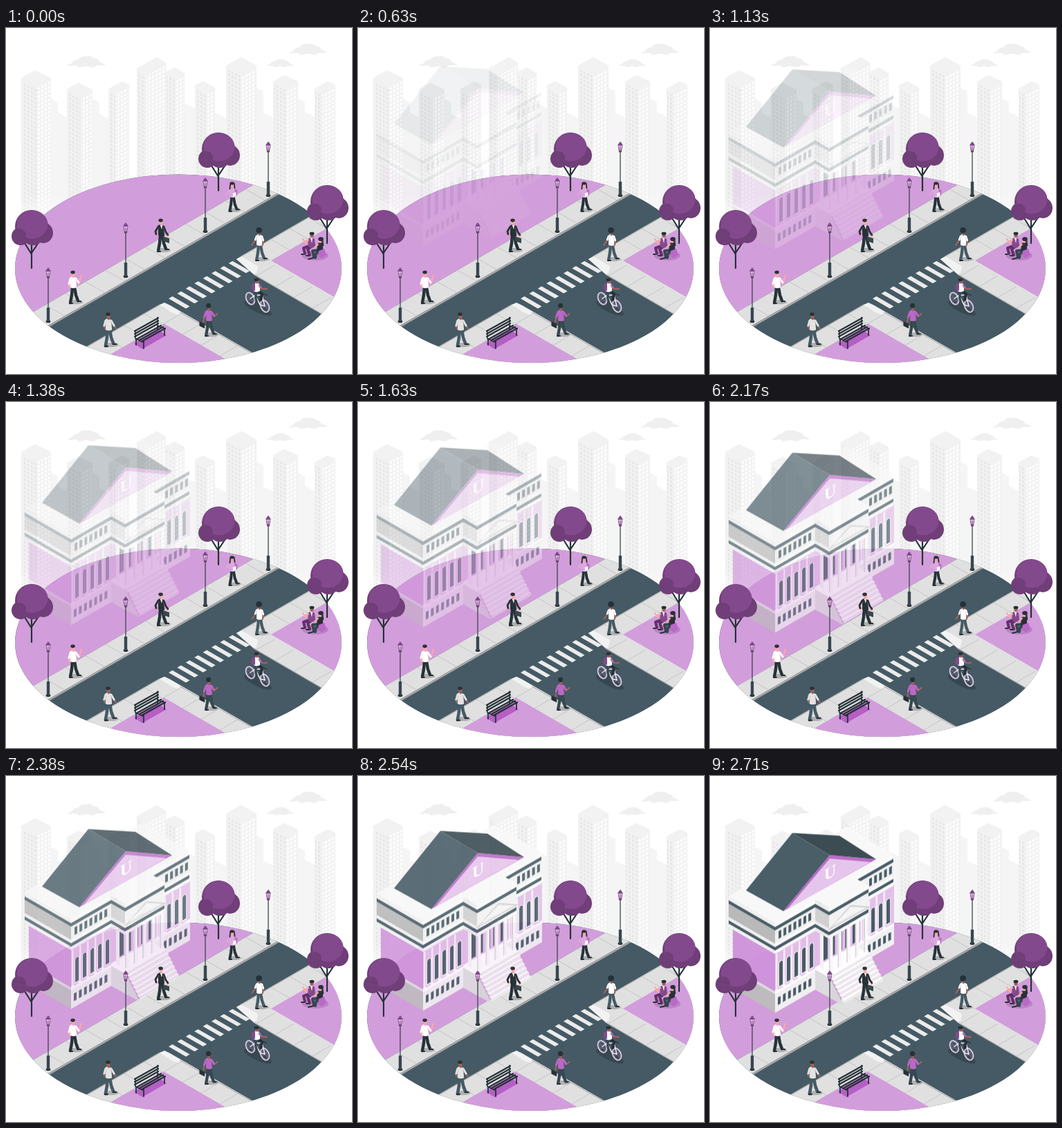
Write an HTML page that moves like this. It is 500 px wide and 500 px high and loops after 2750 ms.

```html
<!DOCTYPE html>
<html lang="en">
<head>
<meta charset="utf-8">
<title>City crossing</title>
<style>
  html, body { margin: 0; width: 100%; height: 100%; overflow: hidden; background: #fff; }
  svg { display: block; width: 100vw; height: 100vh; }
  .hall { animation: settle 2750ms ease-in infinite; }
  @keyframes settle {
    from { opacity: 0; transform: translateY(-30px); }
    to { opacity: 1; transform: translateY(0); }
  }
</style>
</head>
<body>
<svg id="stage" viewBox="0 0 500 500"></svg>
<script>
const DARK = '#263238', SLATE = '#455a64', NIGHT = '#37474f';
const LAWN = '#d29ddb', PLUM = '#82498c', DEEP = '#703e78', ORCHID = '#ba68c8';
const PAVE = '#e0e0e0', SKIN = '#ffa8a0', BROWN = '#a5605a';
const ISO = 0.577;

const poly = (pts, fill, extra = '') => `<polygon points="${pts}" fill="${fill}" ${extra}/>`;
const line = (d, stroke, w = 1) =>
  `<path d="${d}" fill="none" stroke="${stroke}" stroke-width="${w}" stroke-linecap="round" stroke-linejoin="round"/>`;
const shape = (d, fill) => `<path d="${d}" fill="${fill}"/>`;
const rect = (x, y, w, h, fill) => `<rect x="${x}" y="${y}" width="${w}" height="${h}" fill="${fill}"/>`;
const oval = (x, y, rx, ry, fill, extra = '') =>
  `<ellipse cx="${x}" cy="${y}" rx="${rx}" ry="${ry}" fill="${fill}" ${extra}/>`;
const at = (x, y, body, s = 1) => `<g transform="translate(${x} ${y}) scale(${s})">${body}</g>`;
// Upright planes: dir -1 rises to the right, +1 falls to the right.
const plane = (x, y, dir, body) => `<g transform="matrix(1 ${dir * ISO} 0 1 ${x} ${y})">${body}</g>`;
const repeat = (n, f) => Array.from({ length: n }, (_, i) => f(i)).join('');

const defs = `<defs>
  <clipPath id="disc"><ellipse cx="249" cy="347.7" rx="236" ry="136.3"/></clipPath>
  <pattern id="shade" width="5" height="6" patternUnits="userSpaceOnUse" patternTransform="matrix(1 .5 0 1 0 0)">
    ${rect(1, 1, 2.6, 3.6, '#e5e5e5')}</pattern>
  <pattern id="lit" width="5" height="6" patternUnits="userSpaceOnUse" patternTransform="matrix(1 -.5 0 1 0 0)">
    ${rect(1, 1, 3, 3.6, '#fff')}</pattern>
  <linearGradient id="mist" x1="0" y1="0" x2="0" y2="1">
    <stop offset="0" stop-color="#fff" stop-opacity="0"/><stop offset="1" stop-color="#fff"/></linearGradient>
</defs>`;

function tower(lx, ly, px, py, rx, ry) {
  const fx = lx + rx - px, fy = ly + ry - py;
  return poly([lx, ly, px, py, rx, ry, rx, 290, lx, 290], '#f2f2f2') +
    poly([lx + 1, ly + 4, fx, fy + 4, fx, 290, lx + 1, 290], 'url(#shade)') +
    poly([fx, fy + 4, rx - 1, ry + 4, rx - 1, 290, fx, 290], 'url(#lit)');
}
const block = (x, w, y) => poly([x, y, x + w, y + w * 0.5, x + w, 290, x, 290], '#f5f5f5');

const skyline =
  block(64, 11, 102) + block(74, 16, 122) + block(124, 11, 102) + block(134, 15, 124) +
  block(257, 17, 108) + block(301, 18, 122) + block(361, 11, 86) + block(371, 16, 122) +
  block(421, 11, 102) + block(431, 16, 121) +
  tower(231, 63, 244, 57, 258, 65) + tower(22, 72, 42, 61, 65, 72) +
  tower(88, 88, 105, 79, 125, 89) + tower(148, 88, 168, 77, 178, 82) +
  tower(189, 58, 218, 42, 231, 50) + tower(273, 83, 285, 77, 302, 86) +
  tower(318, 54, 340, 42, 362, 54) + tower(386, 77, 402, 68, 422, 77) +
  tower(446, 87, 465, 77, 476, 82) + rect(0, 240, 500, 55, 'url(#mist)');

const puff = shape('M-28 6 L-20 1 Q-18 -3 -12 -3 Q-7 -9 0 -8 Q6 -10 12 -5 Q18 -5 19 0 Q24 1 28 5 L16 5 L10 8 L0 6 L-10 8 L-15 5 Z', '#efefef');
const clouds = at(116, 49, puff) + at(396, 51, puff, .72) + at(436, 31, puff);

const stripes = repeat(8, i => at(235 + i * 12.4, 391 - i * 7.3,
  poly([0, 0, 5.5, -3.2, 30.5, 11.2, 25, 14.4], '#ebebeb')));
const joint = (x, y, dx, dy) => line(`M${x} ${y}l${dx} ${dy}`, '#b8b8b8', .7);

const ground = oval(249, 347.7, 236, 136.3, SLATE) + `<g clip-path="url(#disc)">` +
  poly([0, 433, 0, 180, 440, 179], LAWN) +
  poly([0, 433, 440, 179, 468, 195, 0, 465], PAVE) +
  poly([0, 465, 468, 195, 468, 198, 0, 468], '#a6a6a6') +
  repeat(15, i => joint(28 + i * 29, 417 - i * 16.7, 28, 16)) +
  poly([40, 505, 222, 400, 229, 397, 236, 400, 420, 506, 300, 570], PAVE) +
  poly([222, 400, 229, 397, 252, 410, 250, 415, 241, 412], '#f2f2f2') +
  line('M222 400L40 505M252 411L420 507', '#b5b5b5', 1.4) +
  repeat(5, i => joint(200 - i * 29, 413 + i * 16.7, 26, 15)) +
  repeat(5, i => joint(254 + i * 27, 412 + i * 15.6, -27, 16)) +
  poly([60, 524, 228, 427, 420, 538], LAWN) +
  poly([333, 334, 520, 226, 520, 450, 358, 356], PAVE) +
  poly([333, 334, 340, 330, 364, 344, 362, 354, 358, 356], '#f2f2f2') +
  line('M340 330L520 226M358 356L520 450', '#b5b5b5', 1.4) +
  repeat(4, i => joint(356 + i * 27, 321 - i * 15.6, 26, 15)) +
  repeat(5, i => joint(362 + i * 27, 358 + i * 15.6, 26, -15)) +
  poly([383, 336, 520, 257, 520, 415], LAWN) +
  stripes + '</g>';

// Wall layers shared by every face of the hall, from cornice to lower string course.
const bands = (x, w, tone, attic) =>
  rect(x, 0, w, 6.5, tone) + rect(x, 11, w, 20, attic) + rect(x, 30, w, 5.5, tone) +
  rect(x, 6, w, 5, SLATE) + rect(x, 35, w, 5, SLATE) + rect(x, 40, w, 5, tone);
const slots = (x, n, gap, y, h) => repeat(n, i => rect(x + i * gap, y, 4, h, SLATE));
const arch = x => shape(`M${x} 97V63a3.6 4 0 0 1 7.2 0V97Z`, '#fafafa') +
  shape(`M${x + 1} 95V63a2.6 3 0 0 1 5.2 0V95Z`, SLATE);
const pilaster = x => rect(x, 46, 2.6, 54, '#f5f0f6') + rect(x - .8, 97, 4.2, 4, '#fff');

const leftSide = plane(94, 213, 1,
  rect(-61, 44, 61, 57, '#cf94db') + rect(-61, 100, 61, 30, '#bdbdbd') + rect(-61, 99, 61, 4, '#e0e0e0') +
  bands(-67, 67, '#f0f0f0', '#b8b8b8'));

const mainFront = plane(94, 213, -1,
  rect(0, 44, 172, 57, '#e3bfe9') + rect(0, 100, 172, 30, '#f2f2f2') + rect(0, 99, 172, 4, '#fff') +
  repeat(5, i => arch(5 + i * 11) + pilaster(1 + i * 11)) +
  repeat(5, i => rect(70 + i * 10.5, 47, 6, 48, SLATE)) +
  repeat(4, i => arch(127 + i * 11) + pilaster(123.5 + i * 11)) +
  slots(4, 7, 7.4, 110, 11) + slots(134, 5, 7.4, 110, 11) +
  bands(0, 171, '#fafafa', '#f0f0f0') +
  slots(5, 7, 7.2, 15, 11) + slots(136, 5, 7.2, 15, 11));

const deck = poly([27, 174, 197, 74, 265, 114, 228, 136, 208, 147, 228, 159, 172, 191, 152, 179.5, 94, 213], '#f8f8f8');

const roof =
  poly([173, 115, 240, 121, 106, 196], ORCHID) +
  poly([173, 120, 232, 125, 112, 193], '#e6c4ec') +
  poly([119, 83, 187, 87, 240, 121, 173, 115], NIGHT) +
  poly([119, 83, 52, 166, 106, 196, 173, 115], SLATE) +
  `<text transform="matrix(1 -.577 0 1 165 153)" font-family="Liberation Serif, serif" font-weight="700" font-size="24" fill="#fff">U</text>`;

const steps = repeat(7, i => at(172 + i * 3, 288 + i * 6,
  poly([0, 0, 57, -33, 60, -31, 3, 2], '#fff') + poly([3, 2, 60, -31, 60, -27, 3, 6], '#ececec')));

const portico =
  plane(152, 179.5, 1, rect(0, 97, 21, 33, '#dedede') + rect(0, 97, 21, 4, '#fff')) +
  poly([172, 290, 193, 332, 172, 321], '#d8d8d8') +
  poly([152, 277, 208, 245, 229, 257, 172, 290], '#fff') + steps +
  plane(152, 179.5, 1, rect(7, 44, 5, 50, '#f4f4f4') + bands(0, 20, '#ececec', '#cfcfcf')) +
  plane(172, 191, -1,
    repeat(5, i => rect(i * 12.6, 43, 5.6, 53, '#fafafa') + rect(i * 12.6, 43, 1.6, 53, '#dadada') +
      rect(i * 12.6 - 1, 94, 7.6, 4, '#fff')) +
    bands(0, 57, '#fafafa', '#f2f2f2')) +
  poly([172, 223, 203, 188, 230, 190], '#e8e8e8', 'stroke="#aaa" stroke-width=".7"') +
  poly([178, 216, 203, 191, 224, 191], '#f5f5f5');

const hall = `<g class="hall">${leftSide}${mainFront}${deck}${roof}${portico}</g>`;

const tree = (x, y) => at(x, y,
  line('M0 0V-36M0 -20L-10 -36M0 -22L10 -37', DARK, 2.2) +
  oval(-16, -46, 13, 13, DEEP) + oval(17, -51, 14, 15, DEEP) + oval(2, -45, 14, 12, DEEP) +
  oval(0, -60, 24, 24, DEEP) + oval(1, -63, 22.5, 20.5, PLUM) + oval(-17, -48, 9, 9, DEEP));

const lamp = (x, y) => at(x, y,
  oval(0, 0, 3.4, 2, DARK) + line('M0 -2V-66', NIGHT, 1.3) + rect(-2.2, -20, 4.4, 20, NIGHT) +
  poly([-3, -72, 3, -72, 2, -64, -2, -64], '#eed5f2') +
  line('M-2.6 -71L-1.6 -64M0 -71V-64M2.6 -71L1.6 -64', DEEP, 1) +
  shape('M-4 -72Q-2 -76 0 -78Q2 -76 4 -72Z', PLUM) + rect(-2, -65, 4, 2.5, DEEP));

function person(x, y, o) {
  const skin = o.skin || SKIN, coat = o.sleeve || o.top;
  return at(x, y,
    oval(4, -2, 10, 3.2, '#000', 'opacity=".22"') +
    line('M-1 -23L-2 -12L-4 -1', o.legs, 4.4) + line('M2 -23L4 -12L7 -4', o.legs, 4.4) +
    line('M-5 0h4M7 -3h4', DARK, 2.2) +
    shape('M-4 -38Q0 -40 4 -37L5 -23Q0 -21 -4 -23Z', o.top) +
    line(`M-4 -35${o.left}`, skin, 2.3) + line(`M4 -35${o.right}`, skin, 2.3) +
    line(`M-4 -36${o.left.split('L')[0]}`, coat, 2.8) + line(`M4 -36${o.right.split('L')[0]}`, coat, 2.8) +
    rect(-1, -41, 2.4, 4, skin) + oval(0, -43, 2.8, 3.6, skin) +
    oval(-.4, -45, o.hair || 3.2, o.hair || 2.4, DARK) + (o.extra || ''), o.s || 1);
}

const people =
  person(97, 398, { top: '#fff', legs: DARK, left: 'l-2 8L-5 -23', right: 'l4 6L12 -40' }) +
  person(224, 323, { top: DARK, legs: DARK, left: 'l-4 7l1 4L-5 -25', right: 'l3 8l3 4L9 -22',
    extra: poly([3, -22, 12, -19, 12, -12, 3, -15], NIGHT) + poly([-1, -38, 2, -38, 1, -32], '#fff') }) +
  person(327, 265, { top: '#d9a9e2', legs: DARK, left: 'l-4 6L-7 -29', right: 'l3 7L4 -25', s: .9,
    extra: line('M-3 -45L-4 -36M3 -45L4 -37', DARK, 2) + poly([4, -36, 8, -34, 8, -26, 4, -24], ORCHID) +
      poly([1, -29, 6, -31, 6, -25, 1, -23], '#fff') }) +
  person(366, 336, { top: '#fff', legs: SLATE, skin: BROWN, left: 'l-2 5L-11 -23', right: 'l2 6L5 -23', hair: 4.6, s: .97 }) +
  person(148, 460, { top: '#e3e3e3', legs: SLATE, skin: BROWN, left: 'l-2 7L-5 -25', right: 'l4 7L11 -25', s: 1.03 }) +
  person(293, 445, { top: ORCHID, legs: NIGHT, skin: BROWN, left: 'l-3 8L-8 -20', right: 'l4 6L13 -33', hair: 3.8, s: .97,
    extra: poly([-14, -22, -6, -18, -6, -11, -14, -15], DARK) });

const wheel = (x, y) => oval(x, y, 5.8, 9, 'none', `stroke="#e8c9ee" stroke-width="1.8" transform="rotate(-24 ${x} ${y})"`) +
  oval(x, y, 4.6, 7.6, 'none', `stroke="#8e8795" stroke-width=".6" transform="rotate(-24 ${x} ${y})"`) +
  line(`M${x - 4} ${y - 5}l8 10m0 -9l-8 8`, '#a49bab', .4);
const cyclist =
  oval(364, 405, 22, 6, '#000', 'opacity=".2" transform="rotate(25 364 405)"') +
  wheel(353, 391) + wheel(374, 402) +
  line('M353 391L360 386L367 400L374 402L370 386L360 386', '#f4e6f6', 1.5) +
  line('M367 388L372 384L377 386', DARK, 1.3) +
  line('M362 379L370 384L368 393', DARK, 4) + line('M361 380L361 391L363 400', NIGHT, 3.4) +
  shape('M358 370Q363 366 367 371L367 380Q362 383 358 380Z', '#fff') +
  shape('M355 371L360 368L360 380L354 378Z', PLUM) +
  line('M366 372L370 377L377 377', BROWN, 2.3) + line('M366 372L368 375', ORCHID, 2.8) +
  oval(363, 366, 2.8, 3.5, BROWN) + oval(362, 363.8, 3.5, 2.4, DARK);

const couple =
  oval(447, 329, 19, 7, DEEP, 'opacity=".25"') +
  line('M441 314L430 318L432 326M441 316L436 320L439 328', '#613168', 4) +
  line('M430 327h-3M438 329h-4', DARK, 2) +
  shape('M436 305Q441 301 446 305L447 316Q441 319 437 316Z', PLUM) +
  line('M437 306L433 311L429 305', SKIN, 2.2) + poly([440, 303, 443, 303, 442, 311], '#fff') +
  oval(442, 299.5, 2.7, 3.5, BROWN) + oval(442, 297, 3.5, 2.3, DARK) +
  line('M453 321L443 322L445 331M455 323L448 326L447 332', NIGHT, 4) + line('M445 332L437 334', DARK, 2) +
  shape('M450 312Q454 308 458 312L458 322Q454 325 449 322Z', DARK) +
  line('M451 313L446 317', SKIN, 2.1) + oval(454, 307, 2.8, 3.4, SKIN) +
  oval(455, 305, 3.8, 3, DARK) + line('M457 306L458 314', DARK, 2.4) +
  shape('M452 322L460 319L463 328L456 333L451 329Z', ORCHID);

const slat = (x, y) => line(`M${x} ${y}l34 -19`, DARK, 2.2);
const bench =
  poly([185, 456, 220, 436, 232, 444, 197, 464], '#b55fc4') +
  line('M188 449V458M199 452V463M229 434V444M219 431V436', DARK, 1.8) +
  slat(186, 438) + slat(186, 442) + slat(186, 446) +
  slat(190, 449) + slat(193, 451) + slat(196, 453) +
  line('M187 437V449L198 454M219 418V430L230 435', DARK, 1.5);

document.getElementById('stage').innerHTML = defs + skyline + clouds + ground + hall +
  tree(307, 235) + tree(37, 347) + couple + tree(464, 311) +
  lamp(379, 242) + lamp(288, 294) + lamp(173, 359) + lamp(61, 424) +
  bench + people + cyclist;
</script>
</body>
</html>
```
